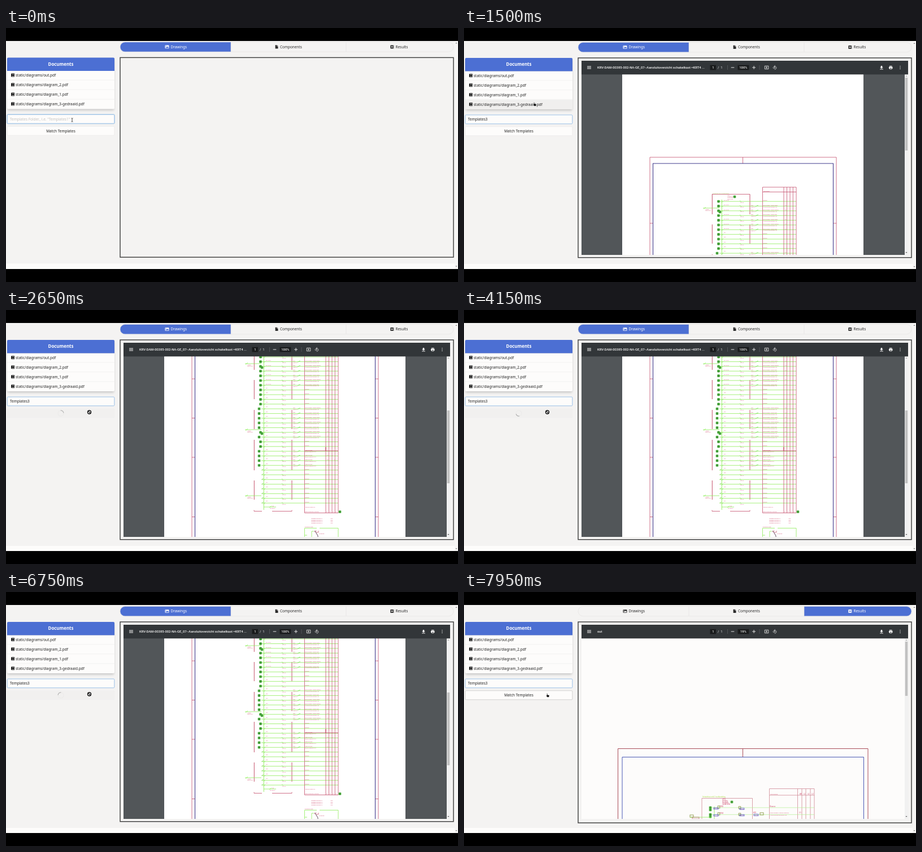
These frames come from a looping animation (800x450 px, 8000 ms). An HTML page:

```html
<!DOCTYPE html>
<html lang="en">
<head>
<meta charset="utf-8">
<title>Template matching</title>
<style>
  html, body { margin: 0; width: 100%; height: 100%; overflow: hidden; background: #000; }
  svg { display: block; width: 800px; height: 450px; }
  text { font-family: "Noto Sans", "Open Sans", sans-serif; font-size: 6.43px; white-space: pre; }
  .bar text { font-family: Roboto, sans-serif; font-size: 5.8px; font-weight: 500; fill: #f4f4f4; }
  .doc text { font-family: "Liberation Sans", Arial, sans-serif; font-size: 1.9px; fill: #c8325a; }
  .doc path, .doc rect { fill: none; }
  .mid { text-anchor: middle; }
  .tab { fill: #2b2b2b; }
  .tab.on { fill: #fff; }
</style>
</head>
<body>
<svg viewBox="0 0 800 450">
  <defs>
    <clipPath id="page"><rect x="208" y="82" width="572" height="320"/></clipPath>
    <clipPath id="screen"><rect y="23" width="800" height="404"/></clipPath>
    <clipPath id="pill"><rect x="202" y="25.5" width="590" height="17.3" rx="8.6"/></clipPath>
    <filter id="soft" x="-10%" y="-10%" width="120%" height="130%"><feGaussianBlur stdDeviation="2"/></filter>
    <path id="valve" d="M-2.4-1.6L2.4 1.6M-2.4 1.6L2.4-1.6M0-2.6V2.6M-2.6 0H2.6M-1.8-1.8H1.8V1.8H-1.8Z" stroke="#58d048" stroke-width=".6"/>
    <path id="book" d="M1.2 0H6V6H1.2Q0 6 0 4.8V1.2Q0 0 1.2 0Z" fill="#222"/>
  </defs>
  <rect width="800" height="450"/>
  <g clip-path="url(#screen)">
    <rect y="23" width="800" height="404" fill="#f4f3f2"/>
    <g id="ui">
      <rect y="418" width="794" height="10" fill="#fdfcfb"/>
      <rect x="794" y="22" width="6" height="406" fill="#f7f6f5"/>
      <path d="M795.4 28l1.6-2 1.6 2ZM795.4 422l1.6 2 1.6-2Z" fill="#888"/>

      <g clip-path="url(#pill)">
        <rect id="active" y="25" height="18" fill="#4c6fd3"/>
      </g>
      <rect x="202" y="25.5" width="590" height="17.3" rx="8.6" fill="none" stroke="#e2e1e0" stroke-width=".6"/>
      <path d="M398 26V42.5M602 26V42.5" stroke="#e2e1e0" stroke-width=".6"/>
      <g class="tab">
        <path fill-rule="evenodd" d="M282.3 31.2H287.7Q288.5 31.2 288.5 32V36Q288.5 36.8 287.7 36.8H282.3Q281.5 36.8 281.5 36V32Q281.5 31.2 282.3 31.2ZM282.5 36H287.6V34.6L286 33L284.4 34.7L283.6 34L282.5 35ZM282.6 32.2V33.4H283.8V32.2Z"/>
        <text x="291.5" y="36.4">Drawings</text>
      </g>
      <g class="tab">
        <path d="M476.6 30.8H479.4V33H481.5V37H476.6ZM479.9 30.8L481.5 32.5H479.9Z"/>
        <text x="485" y="36.4">Components</text>
      </g>
      <g class="tab">
        <path fill-rule="evenodd" d="M681 31H686V37H681Q680.4 37 680.4 36.4V31.6Q680.4 31 681 31ZM685.6 31H686.4V37H685.6ZM682.2 32.3V35.7L685 34Z"/>
        <text x="689.5" y="36.4">Results</text>
      </g>

      <rect x="3" y="56" width="188" height="90" fill="#000" opacity=".2" filter="url(#soft)"/>
      <path d="M2 76.5H192V142Q192 144 190 144H4Q2 144 2 142Z" fill="#fdfcfb"/>
      <path d="M2 76.5V55Q2 53 4 53H190Q192 53 192 55V76.5Z" fill="#4c6fd3"/>
      <text class="mid" x="97" y="67.3" style="font-size:7.9px;font-weight:700" fill="#fff">Documents</text>
      <rect id="hover" x="2" width="190" height="16.8" fill="#f0efee"/>
      <g id="files"></g>

      <rect id="glow" x="1.7" y="153.5" width="190.6" height="16.8" rx="1.8" fill="none" stroke="#bcd4ea"/>
      <rect x="2.2" y="154" width="189.6" height="15.8" rx="1.5" fill="#fdfcfb" stroke="#85b3e2" stroke-width=".8"/>
      <text id="entry" x="7" y="164.4"></text>
      <rect id="button" x="2.2" y="174.8" width="189.6" height="16" rx="1.5" stroke-width=".6"/>
      <text id="match" class="mid" x="97" y="185.2" fill="#222">Match Templates</text>
      <g id="spinner" fill="none">
        <circle cx="97" cy="183" r="5" stroke="#ebeae9"/>
        <path d="M93.46 179.46A5 5 0 0 1 100.54 179.46" stroke="#adadad" stroke-width="1.1"/>
      </g>

      <rect id="box" x="202" y="53" width="590" fill="none" stroke="#3a3a3a" stroke-width="1.4"/>
      <g id="viewer">
        <rect x="208" y="58" width="578" height="344" fill="#525659"/>
        <g clip-path="url(#page)">
          <g id="drawing" class="doc"></g>
          <g id="result" class="doc"></g>
        </g>
        <rect x="780" y="82" width="6" height="320" fill="#f1f1f1"/>
        <rect id="thumb" x="780.8" width="4.4" fill="#c1c1c1"/>
        <path d="M781.5 86l1.5-1.8 1.5 1.8Z" fill="#a3a3a3"/>
        <path d="M781.5 397l1.5 1.8 1.5-1.8Z" fill="#505050"/>
        <g class="bar">
          <rect x="208" y="58" width="578" height="24.3" fill="#323639"/>
          <path d="M218 68H225M218 70H225M218 72H225M472.7 70H478.3M510.2 70H516M513.1 67.1V72.9" stroke="#f4f4f4" stroke-width=".9"/>
          <path d="M466.5 66V74M523 66V74" stroke="#666a6d" stroke-width=".6"/>
          <rect x="435.5" y="65.8" width="10.5" height="8.6" fill="#191b1c"/>
          <rect x="484.5" y="65.8" width="19.8" height="8.6" fill="#191b1c"/>
          <text id="title" x="236" y="72"></text>
          <text x="439.2" y="72">1</text>
          <text x="449" y="72" style="font-weight:400">/  1</text>
          <text id="zoom" class="mid" x="494.4" y="72"></text>
          <path d="M532.3 67.3H538.8V72.7H532.3ZM535.5 68.4V71.6M534 70H537" fill="none" stroke="#f4f4f4" stroke-width=".8"/>
          <path d="M549.7 68A2.6 2.6 0 1 1 549.7 73.1M550.6 66.3L548.8 68L550.6 69.6M547 70.4L548.7 68.7L550.4 70.4L548.7 72.1Z" fill="none" stroke="#f4f4f4" stroke-width=".75"/>
          <path d="M737.8 67H740.2V69.2H741.8L739 72L736.2 69.2H737.8ZM736.2 72.6H741.8V73.4H736.2ZM753 67H757.5V68.3H753ZM752 68.8H758.5V72H757.4V73.2H753.2V72H752Z" fill="#f4f4f4"/>
          <path d="M754 71.2H756.6V72.5H754Z" fill="#323639"/>
          <path d="M772 67.6h.01M772 70h.01M772 72.4h.01" stroke="#f4f4f4" stroke-width="1.3" stroke-linecap="round"/>
        </g>
      </g>
    </g>
    <g id="cursor">
      <path d="M-1.5-3.2Q0-3.2 0-2.5Q0-3.2 1.5-3.2M0-2.5V2.5M-1.5 3.2Q0 3.2 0 2.5Q0 3.2 1.5 3.2" fill="none" stroke="#222" stroke-width=".8"/>
      <path d="M-1.5-3.5V2.4L-.2 1.3L.8 3.5L1.9 3L.9 .8H2.6Z" fill="#000" stroke="#fff" stroke-width=".5"/>
      <path d="M-1.4-3.2Q-.7-3.6-.2-3V-.8L2.4-.3Q3.1 0 2.9 1L2.4 3.2H-1L-2.6 .6Q-2.4-.2-1.4 .3Z" fill="#000" stroke="#fff" stroke-width=".5"/>
      <g><circle r="3" fill="#eee" stroke="#111" stroke-width="1.4"/><path d="M-2.1-2.1L2.1 2.1" stroke="#111" stroke-width="1.3"/></g>
    </g>
  </g>
</svg>
<script>
const LOOP = 8000, STEP = 50;
const PDF_AT = 1450, LOAD_AT = 2400, DONE_AT = 7900;
const RED = '#c4506c', LIME = '#8fec58';
const $ = id => document.getElementById(id);
const set = (node, attrs) => { for (const k in attrs) node.setAttribute(k, attrs[k]); return node; };
const show = (node, on) => { node.style.display = on ? '' : 'none'; };
const add = (parent, tag, attrs) =>
  parent.appendChild(set(document.createElementNS('http://www.w3.org/2000/svg', tag), attrs));
const label = (parent, x, y, string, attrs = {}) => { add(parent, 'text', { x, y, ...attrs }).textContent = string; };
const stroke = (parent, d, color, width = .8) => add(parent, 'path', { d, stroke: color, 'stroke-width': width });
const valve = (parent, x, y) => add(parent, 'use', { href: '#valve', x, y });

['out', 'diagram_2', 'diagram_1', 'diagram_3-gedraaid'].forEach((name, i) => {
  const y = 84.2 + 17 * i, list = $('files');
  if (i) add(list, 'path', { d: `M2 ${y - 8.4}H192`, stroke: '#e9e8e7', 'stroke-width': .6 });
  add(list, 'use', { href: '#book', x: 9, y: y - 3 });
  add(list, 'path', { d: `M10.5 ${y + 1.8}H14.4M11 ${y - 1.5}H14`, stroke: '#fff', 'stroke-width': .6 });
  label(list, 17, y + 2.3, `static/diagrams/${name}.pdf`, { fill: '#222' });
});

// The drawing is laid out for the fully scrolled position.
function buildDrawing(g) {
  add(g, 'rect', { x: 280, y: -160, width: 427, height: 700, style: 'fill:#fff' });
  stroke(g, 'M329 600V5H659V600M493.5 5V16', RED);
  stroke(g, 'M334.5 600V16H653.5V600', '#3f3a8c', 1.1);
  for (const y of [122, 191.5, 261, 366.5]) stroke(g, `M329 ${y}H334M654 ${y}H659`, RED);

  stroke(g, 'M439 70.5H506M439 354.5V356.5H453M471 356.5H506V354.5', RED);
  for (const [a, b] of [[70.5, 106], [124, 158], [177, 211], [230, 284], [302, 336]])
    stroke(g, `M439.3 ${a}V${b}M506 ${a}V${b}`, RED, 1);
  label(g, 440, 70, 'Schakelkast veld 1 hoofdverdeling', { style: 'fill:#a3dc50' });
  for (let i = 0; i < 4; i++) label(g, 466, 73 + 2.2 * i, ['=K01', 'Voeding 400V', 'Hoofdschak.', '3x63A 50Hz'][i]);
  valve(g, 479, 75);

  stroke(g, 'M456.3 80V354', LIME, .9);
  for (let i = 0; i < 32; i++) {
    const y = 83.2 + 8.35 * i;
    const full = (i > 0 && i < 7) || (i > 10 && i < 18), medium = i > 19 && i < 24;
    stroke(g, `M452 ${y}H588`, LIME);
    if (i < 24) valve(g, i < 11 || i === 16 || i === 18 || i === 19 ? 450.5 : 448, y);
    else stroke(g, `M453 ${y}l2.5-2`, '#70cc50', .7);
    stroke(g, `M456 ${y + 2}l3-3M488 ${y - 1.4}l3 2.6`, '#78d850', .6);
    label(g, 460, y - 1.2 - (i > 6 ? 1.4 : 0), i < 7 ? `F${i + 10} 16A/C` : `F${i + 10}`);
    label(g, 489, y + 2.5, '16A 3P');
    if (full || medium) {
      label(g, 508, y - 1, 'W' + (i + 20));
      label(g, 508, y + 2.2, 'YMvK 3x');
      stroke(g, `M516 ${y + 1}l2-1.5 3-1`, '#70d850', .7);
      label(g, 568, y - .7, '2.5');
    }
    if (full) label(g, 529.5, y - .8, 'WCD GROEP LABORATORIUM'.slice(0, 20 + i % 3));
    else label(g, 529.5, y - .8, medium ? 'VERLICHTING' : 'Reserve');
    if (full || medium) label(g, 529.5, y + 2.1, medium ? 'NOODVOEDING ZAAL' : 'AANSLUITING RUIMTE 0.12');
    if (medium) label(g, 573 + (i - 20) * 4 % 12, y - .7, 'x');
  }
  valve(g, 453, 102);
  valve(g, 453, 219);
  for (const y of [95, 212, 329]) {
    stroke(g, `M423 ${y}H452M424 ${y + 1.5}l4-3`, LIME);
    label(g, 427, y + 3, 'Aarding');
    label(g, 427, y + 5.2, '25mm2 GG');
  }
  stroke(g, 'M456 349H478M466 350l4-3', LIME);
  label(g, 471, 347.5, 'Rail'); label(g, 467, 351.5, 'PE rail 63A');

  stroke(g, 'M528.5 359.5V58H588V359.5ZM528.5 66.5H588M566 58V359.5M571.5 58V359.5M577 58V359.5M582.3 58V359.5M528.5 249.5H588', RED);
  stroke(g, 'M566 243V250', RED, 1.2);
  label(g, 530, 65.5, 'Omschrijving');
  label(g, 530, 350, 'Reserve ruimte 20%');
  label(g, 529, 358.3, 'Totaal aangesloten vermogen');
  for (const x of [567, 572.5, 578, 583]) label(g, x, 358.3, '0.0');
  valve(g, 591, 357.5);
  for (let i = 0; i < 4; i++) {
    label(g, 540, 370 + 2.7 * i, 'Gelijktijdig vermogen L' + (i + 1));
    label(g, 574.5, 370 + 2.7 * i, '0kW');
  }
  label(g, 528.5, 384.5, 'Stuurstroom regel');
  stroke(g, 'M528.5 402V386.5H550M555 386.5H588V402M528.5 399H533M541 402V392H545', LIME);
  stroke(g, 'M546.5 391L552 400V403', '#503048', .9);
  stroke(g, 'M545.5 393l4-2M549 394h4V391', RED, .7);
  label(g, 554, 397, 'Schakelaar');
}

function buildResult(g) {
  add(g, 'rect', { x: 208, y: 82, width: 572, height: 320, style: 'fill:#fdfcfb' });
  stroke(g, 'M272.5 410V277.5H715V410M493.5 277.5V292', '#a94c58', 1);
  stroke(g, 'M280 410V292.5H707.5V410', '#4858b4', 1);
  stroke(g, 'M421 410V365.5H510.5V410M540.5 410V348.5H620V410M540.5 360H620M590.5 348.5V410M598 348.5V410M605 348.5V410M613 348.5V410', '#d08a96', .8);
  label(g, 422, 364, 'Schakelkast veld 1 hoofdverdeling', { style: 'fill:#a8dc40;font-size:2.7px' });
  const size = { style: 'font-size:2.6px' };
  for (let i = 0; i < 4; i++) label(g, 457, 368 + 3 * i, ['=K01', 'Voeding', 'Hoofdsch.', '3x63A 50Hz'][i], size);
  for (const y of [382, 394.3]) {
    stroke(g, `M438 ${y}H620`, '#b4f090', .7);
    valve(g, 436, y); valve(g, 436, y + 4);
    label(g, 453, y - 1, 'F' + Math.round(y), size);
  }
  stroke(g, 'M443 380V410', LIME);
  valve(g, 474, 372);
  for (const [x, y] of [[451, 381], [488, 382], [451, 393], [488, 394], [403, 397], [527, 393]]) {
    const w = x === 403 || x === 527 ? 6 : 3.6;
    add(g, 'rect', { x: x - w / 2, y: y - 2, width: w, height: 4, stroke: '#7d8c30', 'stroke-width': .8 });
  }
  for (const [x, y] of [[446, 383.5], [492, 384.3], [446, 395.7], [492, 395.5], [517, 395]]) {
    add(g, 'rect', { x: x - 4, y: y - 1.3, width: 8, height: 2.6, stroke: '#4048d0', 'stroke-width': .7 });
    label(g, x - 3.5, y + .9, '16A 3P', { style: 'font-size:2.2px' });
  }
  stroke(g, 'M400 399H438', LIME);
  add(g, 'rect', { x: 404, y: 399, width: 12, height: 3, stroke: '#b04058', 'stroke-width': .6 });
  label(g, 512, 392, 'W21', size);
  label(g, 542, 358.5, 'Omschrijving', { style: 'font-size:2.3px' });
  ['kW', 'L1', 'L2', 'L3'].forEach((s, i) => label(g, 594 + 7.2 * i, 358.5, s, size));
  label(g, 541.5, 380.5, 'Reserve', size);
  label(g, 541.5, 391.8, 'WCD GROEP LABORATORIUM', { style: 'font-size:2.3px' });
  label(g, 541.5, 396.3, 'AANSLUITING RUIMTE 0.12', { style: 'font-size:2.3px' });
  label(g, 593, 391.8, '2.5', size);
}
buildDrawing($('drawing'));
buildResult($('result'));

// Pointer stops: time, x, y.
const stops = [[0, 117, 163], [650, 117, 163], [1300, 125, 135], [1500, 125, 135],
  [1700, 290, 190], [1950, 290, 190], [2250, 148, 183]];
const ease = p => p * p * (3 - 2 * p);
const progress = (t, a, b) => Math.min(1, Math.max(0, (t - a) / (b - a)));

function pointer(t) {
  let i = stops.length - 2;
  while (i && t < stops[i][0]) i--;
  const [a, ax, ay] = stops[i], [b, bx, by] = stops[i + 1], p = ease(progress(t, a, b));
  return [ax + (bx - ax) * p, ay + (by - ay) * p];
}

const tabs = document.querySelectorAll('.tab'), shapes = $('cursor').children;

function render(t) {
  const loading = t >= LOAD_AT && t < DONE_AT, done = t >= DONE_AT;
  const [x, y] = pointer(t);
  const inside = x < 192, overInput = inside && y > 154 && y < 170;
  const overRow = inside && y > 76 && y < 144, overButton = inside && y > 174.5;

  set($('ui'), { transform: `translate(0 ${t < 50 ? -.6 : 0})` });
  tabs.forEach((tab, i) => tab.classList.toggle('on', i === (done ? 2 : 0)));
  set($('active'), done ? { x: 602, width: 190 } : { x: 202, width: 196 });

  const typed = Math.min(10, Math.max(0, Math.floor((t - 50) / 50)));
  $('entry').textContent = typed ? 'Templates3'.slice(0, typed) : 'Templates Folder., i.e. "Templates1"';
  set($('entry'), { fill: typed ? '#222' : '#c3c2c1' });
  show($('glow'), t < 50);

  show($('hover'), overRow);
  set($('hover'), { y: 76.2 + 17 * Math.min(3, Math.max(0, Math.floor((y - 76) / 17))) });
  set($('button'), { fill: loading ? '#f1f0ef' : '#fdfcfb', stroke: loading ? '#eeedec' : overButton ? '#b8b7b6' : '#e6e5e4' });
  show($('match'), !loading);
  show($('spinner'), loading);
  set($('spinner'), { transform: `rotate(${40 + (t - 2650) * .595} 97 183)` });

  set($('box'), { height: done ? 356 : 353.7 });
  show($('viewer'), t >= PDF_AT);
  show($('drawing'), !done);
  show($('result'), done);
  const scroll = ease(progress(t, 1650, 1950));
  set($('drawing'), { transform: `translate(0 ${224 * (1 - scroll)})` });
  set($('thumb'), done ? { y: 88, height: 96 } : { y: 88 + 90 * scroll, height: 129 });
  $('title').textContent = done ? 'out' : 'KRV-DAM-00385-002-NA-GE_07--Aansluitoverzicht schakelkast =KRT4 ...';
  $('zoom').textContent = done ? '19%' : '100%';

  const shape = loading ? 3 : overInput ? 0 : overButton || (overRow && t >= 1400) ? 2 : 1;
  for (let i = 0; i < 4; i++) show(shapes[i], i === shape);
  set($('cursor'), { transform: `translate(${loading ? 147.5 : x} ${loading ? 181 : y})` });
}

const start = performance.now();
function tick() {
  const t = (performance.now() - start) % LOOP;
  render(Math.floor(t / STEP) * STEP);
  requestAnimationFrame(tick);
}
tick();
</script>
</body>
</html>
```
